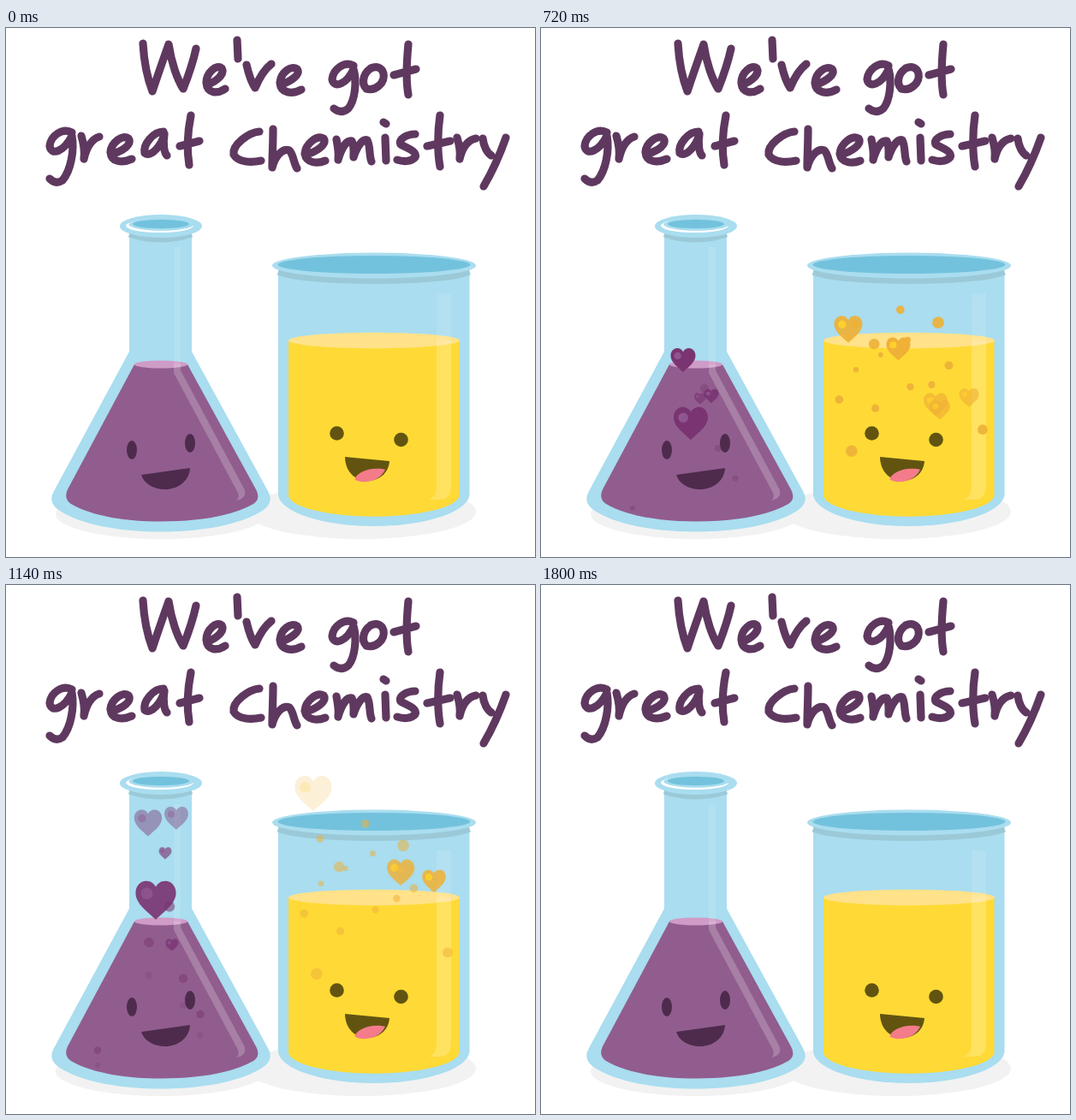
Recreate the animation shown at these times as an HTML page. Size 618x618 px, loop 1860 ms.

```html
<!DOCTYPE html>
<html lang="en">
<head>
<meta charset="utf-8">
<title>We've got great chemistry</title>
<style>
html, body { margin: 0; width: 100%; height: 100%; overflow: hidden; background: #fff; }
svg { display: block; width: 100vw; height: 100vh; }
.lettering { fill: none; stroke: #5f385f; stroke-width: 9.2; stroke-linecap: round; stroke-linejoin: round; }
.glass { fill: #a9ddef; }
.inside { fill: #73c2dd; }
.edge { fill: none; stroke: #9bc9d7; stroke-width: 7; }
.shine { fill: #fff; opacity: .11; }
.plum { fill: #4e2b4d; }
.olive { fill: #625410; }
</style>
</head>
<body>
<svg viewBox="0 0 618 618" role="img" aria-label="We've got great chemistry">
  <defs>
    <path id="smile" d="M396 501L448 506C447 520 436 529 422 529C405 529 396 515 396 501Z"/>
    <path id="flaskShine" d="M196 256H204V400L278 538Q283 549 269 552Q274 548 270 541L196 403Z"/>
    <path id="beakerShine" d="M503 310H520V535Q520 551 506 551H494Q503 548 503 535Z"/>
    <clipPath id="inSmile"><use href="#smile"/></clipPath>
    <clipPath id="inLiquid"><path d="M0 393H260V365H618V618H0Z"/></clipPath>
  </defs>

  <g class="lettering">
    <!-- We've got -->
    <path d="M160 18C161 36 165 58 171 74C177 56 184 36 190 19C193 40 200 60 207 71C213 56 219 38 222 24"/>
    <path d="M236 66C246 62 256 54 252 47C246 42 234 52 234 64C235 77 247 77 256 71"/>
    <path d="M270 14L271 36"/>
    <path d="M281 43C284 56 287 64 291 70C296 58 302 48 310 42"/>
    <path d="M322 66C333 62 345 54 340 48C333 43 321 52 320 64C321 76 334 78 345 72"/>
    <path d="M406 44C396 38 382 48 381 60C383 71 398 66 406 48C410 62 408 84 400 94C394 99 388 98 383 94"/>
    <path d="M429 46C418 50 414 64 421 71C432 74 443 64 441 53C439 46 433 44 426 47"/>
    <path d="M470 19C468 40 467 62 470 78M453 55L479 48"/>
    <!-- great -->
    <path d="M77 122C66 116 52 126 51 138C53 150 68 144 77 126C80 142 76 166 66 178C60 182 55 180 51 176"/>
    <path d="M88 126C91 136 92 146 91 153C94 140 100 130 109 127"/>
    <path d="M124 147C136 144 148 136 143 129C136 124 123 134 122 145C123 157 136 158 147 153"/>
    <path d="M184 121C172 121 160 136 162 146C170 152 182 136 185 124C183 136 185 146 188 149"/>
    <path d="M216 102C212 122 211 142 214 160M203 138L226 132"/>
    <!-- chemistry -->
    <path d="M296 121C284 122 264 136 266 148C272 158 288 157 298 155"/>
    <path d="M312 118C312 135 311 150 311 163C315 148 324 140 331 143C336 148 336 158 340 164"/>
    <path d="M350 148C362 145 376 136 371 129C363 125 350 135 349 147C351 158 364 159 373 155"/>
    <path d="M386 130C388 140 389 148 388 154C392 140 398 131 404 132C407 138 406 146 406 151C410 138 417 129 422 131C426 138 424 150 427 156"/>
    <path d="M443 128L444 155M441 110L444 112"/>
    <path d="M478 124C468 124 458 130 461 136C468 140 481 144 478 151C473 157 463 156 457 154"/>
    <path d="M507 102C504 122 504 146 507 162M492 138L519 132"/>
    <path d="M527 128C530 138 531 146 530 153C533 140 539 131 549 129"/>
    <path d="M557 129C558 138 562 146 567 149M584 128C577 148 568 168 558 185"/>
  </g>

  <g fill="#f2f2f2">
    <ellipse cx="181" cy="568" rx="123" ry="29"/>
    <ellipse cx="415" cy="565" rx="134" ry="32"/>
  </g>

  <!-- flask -->
  <path class="glass" d="M144 231H217V378L306 541Q313 553 302 562C276 581 225 588.500 181 588.500C137 588.500 86 581 60 562Q49 553 56 541L144 378Z"/>
  <path class="edge" d="M144 241Q180 253 217 241"/>
  <ellipse class="glass" cx="181" cy="231.500" rx="48" ry="13.500"/>
  <ellipse fill="#fff" cx="179.500" cy="231" rx="39.500" ry="8"/>
  <ellipse class="glass" cx="181.500" cy="229.500" rx="38" ry="7.200"/>
  <ellipse class="inside" cx="181" cy="229" rx="33" ry="5.200"/>
  <path fill="#915d8e" d="M150 393L72 539Q67 550 76 556C102 571 142 576.500 181 576.500C222 576.500 262 571 289 556Q298 550 292 539L212 393Z"/>
  <ellipse fill="#cf9bc7" cx="181" cy="393" rx="31" ry="4.500"/>

  <!-- beaker -->
  <path class="glass" d="M318 277H541.500V546A112 38.500 0 0 1 318 546Z"/>
  <path class="edge" d="M318 285C350 299 510 299 541.500 285"/>
  <ellipse class="glass" cx="430" cy="277.500" rx="119" ry="15"/>
  <ellipse class="inside" cx="430" cy="276.500" rx="112.500" ry="10.500"/>
  <path fill="#ffda36" d="M330 365H529.500V547A100 25.500 0 0 1 330 547Z"/>
  <ellipse fill="#ffe289" cx="430" cy="365" rx="100" ry="9.300"/>

  <!-- reflections, stronger over liquid -->
  <g class="shine"><use href="#flaskShine"/><use href="#beakerShine"/></g>
  <g class="shine" clip-path="url(#inLiquid)"><use href="#flaskShine"/><use href="#beakerShine"/></g>

  <g id="fizz"></g>

  <!-- faces -->
  <g class="plum">
    <ellipse cx="147" cy="493" rx="6" ry="11"/>
    <ellipse cx="215" cy="485" rx="6" ry="11"/>
    <path d="M158 522L215 514C214 530 200 539 186 539C172 539 161 532 158 522Z"/>
  </g>
  <g class="olive">
    <circle cx="386.500" cy="473.500" r="8.300"/>
    <circle cx="461.500" cy="481" r="8.300"/>
    <use href="#smile"/>
    <ellipse fill="#f47c8a" clip-path="url(#inSmile)" cx="429.500" cy="525.500" rx="22" ry="10.500" transform="rotate(-8 429.500 525.500)"/>
  </g>
</svg>

<script>
const LOOP = 1860, STEP = 60, REPEAT = 840;
const NS = 'http://www.w3.org/2000/svg';
const HEART = 'M0 48C-18 30-50 10-50-18C-50-36-38-48-24-48C-13-48-4-42 0-33C4-42 13-48 24-48C38-48 50-36 50-18C50 10 18 30 0 48Z';
const fizz = document.getElementById('fizz');

// Hearts fade over "haze" pixels once above the liquid's surface
const purple = { heart: '#7a3472', spot: '#8f5590', dot: '#7a3a72', surface: 385, haze: 190 };
const yellow = { heart: '#efb136', spot: '#ffd02c', dot: '#edb13a', surface: 365, haze: 150 };

const clamp = v => Math.max(0, Math.min(1, v));

function add(parent, tag, attrs = {}) {
  const node = parent.appendChild(document.createElementNS(NS, tag));
  for (const key in attrs) node.setAttribute(key, attrs[key]);
  return node;
}

// Each dot of a row gets its place and size from its index
function dotRow(look, count, place, motion) {
  const node = add(fizz, 'g', { fill: look.dot });
  for (let i = 0; i < count; i++) {
    const [cx, cy, r] = place(i);
    add(node, 'circle', { cx, cy, r });
  }
  return t => {
    const [dy, alpha] = motion(t);
    node.setAttribute('transform', `translate(0 ${dy})`);
    for (const dot of node.children) dot.setAttribute('opacity', alpha);
  };
}

// Yellow dots zigzag across the beaker and rise once per loop
function beakerDots(x, y, gap, spread, size, speed) {
  const place = i => {
    const swing = (-1) ** i * Math.cos(.75 * (i - 1)) * (.45 + .1 * i);
    return [x + spread * swing, y + gap * i, size * (1 + .25 * Math.cos(i))];
  };
  const motion = t => [(480 - t) * speed, .92 * clamp(Math.min((t - 60) / 600, (1420 - t) / 480))];
  return dotRow(yellow, 7, place, motion);
}

// Purple dots spread wider with depth and appear twice per loop
function flaskDots(y, gap, size, speed, start) {
  const place = i => {
    const side = i % 3 === 1 ? -1 : 1;
    return [181 + side * (10 + 4 * i * i), y + gap * i, size - .5 * i];
  };
  const motion = t => {
    const age = t < start || t >= start + 2 * REPEAT ? 0 : (t - start) % REPEAT;
    return [(420 - age) * speed, .58 * clamp(Math.min(age / 150, (640 - age) / 220))];
  };
  return dotRow(purple, 5, place, motion);
}

// y and width hold at MID; speed and growth are per second
const MID = 720;
function heart(look, x, y, speed, width, growth, born, gone = 1760) {
  const node = add(fizz, 'g');
  add(node, 'path', { d: HEART, fill: look.heart });
  add(node, 'circle', { cx: -22, cy: -17, r: 14.5, fill: look.spot });
  return t => {
    const s = (t - MID) / 1000;
    const top = y - speed * s;
    const scale = Math.max(0, width + growth * s) / 100;
    const life = clamp((t - born) / 480) * clamp((gone - t) / 240);
    const alpha = life * clamp(1 - (look.surface - top) / look.haze);
    node.setAttribute('transform', `translate(${x} ${top}) scale(${scale})`);
    for (const part of node.children) part.setAttribute('opacity', alpha);
  };
}

const parts = [
  beakerDots(400, 358, 17.5, 60, 3.9, .12),
  beakerDots(436, 367, 25, 85, 5.5, .095),
  flaskDots(368, 42, 6.2, .042, 60),
  flaskDots(421, 35, 5, 0, 240),
  heart(purple, 162, 386, 180, 13, 21, 100, 1080),
  heart(purple, 166, 388, 262, 29, 8, 100, 1500),
  heart(purple, 175, 462, 223, 40, 17, 190),
  heart(purple, 199, 430, 375, 17, 26, 290),
  heart(purple, 186, 433, 285, 14, 2, 390),
  heart(purple, 194, 520, 237, 9, 14, 770),
  heart(yellow, 359, 352, 258, 33, 24, 190),
  heart(yellow, 417.5, 375, 330, 28, 0, 190, 1100),
  heart(yellow, 461, 440, 248, 28, 10, 380),
  heart(yellow, 466, 446, 260, 24, 0, 390, 1200),
  heart(yellow, 500, 432, 205, 23, 11, 420)
];

const begin = performance.now();
function tick() {
  const t = Math.floor((performance.now() - begin) % LOOP / STEP) * STEP;
  for (const draw of parts) draw(t);
  requestAnimationFrame(tick);
}
tick();
</script>
</body>
</html>
```
